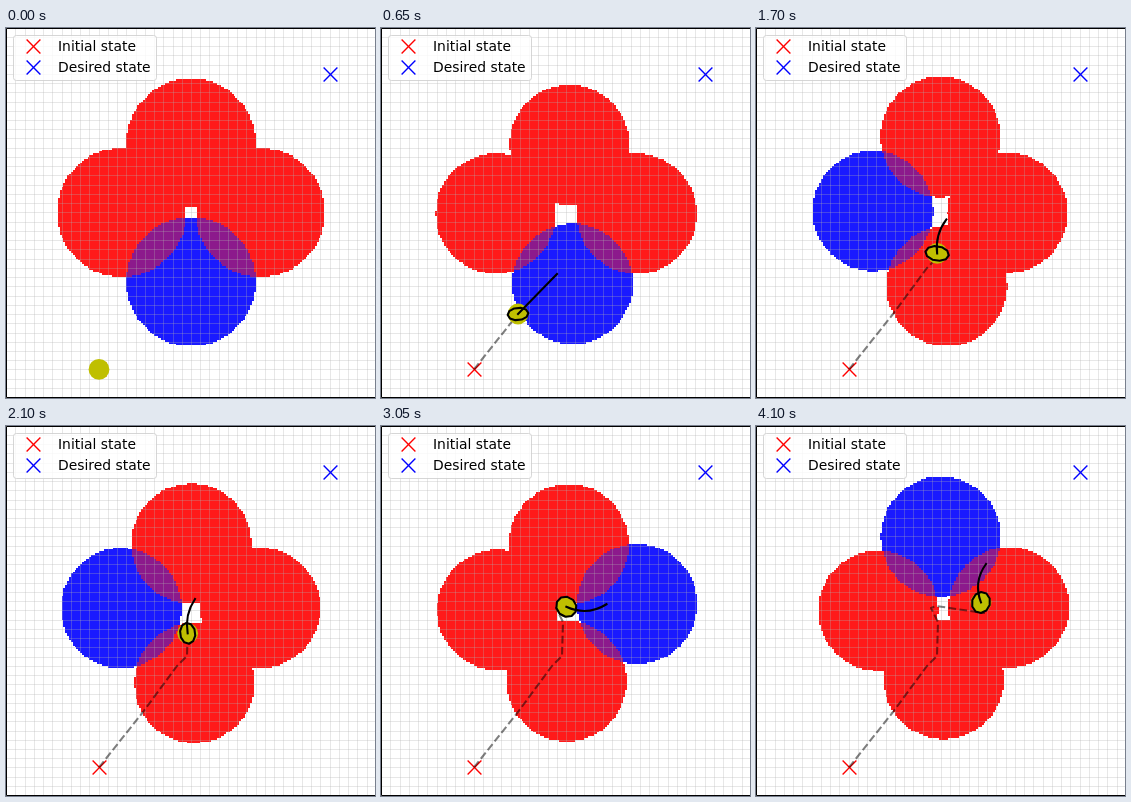
These frames come from a looping animation (369x370 px, 4.15 s). An HTML page:

```html
<!DOCTYPE html>
<html lang="en">
<head>
<meta charset="utf-8">
<title>Path planning between moving regions</title>
<style>
  html, body { margin: 0; width: 100%; height: 100%; overflow: hidden; background: #fff; }
  svg { display: block; width: 100vw; height: 100vh; }
  text { font: 13.89px "DejaVu Sans", sans-serif; }
  .cells { shape-rendering: crispEdges; }
  .line { fill: none; stroke: #000; stroke-width: 2.08; stroke-linejoin: round; }
  .cross { fill: none; stroke-width: 1.39; }
</style>
</head>
<body>
<svg viewBox="0 0 369 370" xmlns="http://www.w3.org/2000/svg">
  <defs><path id="cross" class="cross" d="M-6.9-6.9l13.8 13.8m0-13.8l-13.8 13.8"/></defs>
  <rect width="369" height="370" fill="#fff"/>
  <g class="cells">
    <path id="red" fill="#ff1a1a"/>
    <path id="blue" fill="#1a1aff"/>
    <path id="both" fill="#8c1a8c"/>
  </g>
  <path id="grid" stroke="#b0b0b0" stroke-opacity=".3" fill="none"/>
  <use href="#cross" x="93.5" y="341.5" stroke="red"/>
  <use href="#cross" x="324.5" y="46.5" stroke="blue"/>
  <path id="trail" class="line" stroke-opacity=".5" stroke-dasharray="7.71 3.33"/>
  <circle id="robot" r="10.4" fill="#bfbf00"/>
  <path id="plan" class="line" stroke-linecap="square"/>
  <path id="spread" class="line"/>
  <path d="M369 .5H.5V369.5H369" fill="none" stroke="#000"/>
  <rect x="7.5" y="7.5" width="143" height="45" rx="2.8" fill="#fff" fill-opacity=".8" stroke="#ccc" stroke-opacity=".8"/>
  <use href="#cross" x="27.5" y="18.5" stroke="red"/>
  <use href="#cross" x="27.5" y="39.5" stroke="blue"/>
  <text x="52" y="23">Initial state</text>
  <text x="52" y="44">Desired state</text>
</svg>
<script>
const LOOP = 4150, STEP = 50;
const CELLS = 200, TICKS = 40;

// The plot is 4 units wide and sits slightly off the pixel raster.
const UNIT = 92.4, SIDE = 4 * UNIT, LEFT = 0.2, TOP = -0.4;
const RADIUS = 0.65 * UNIT, FIRST_RADIUS = 0.7 * UNIT, REACH = 0.75 * UNIT;
const WOBBLE = 6;

// Regions are numbered clockwise from the right one.
const PHASES = [
  { until: 31, region: 1, bend: 0 },
  { until: 55, region: 2, bend: -0.2 },
  { until: 76, region: 0, bend: 0.27 },
  { until: Infinity, region: 3, bend: -0.27 }
];

// Key points of the robot and of its planned end: step, x, y
const ROUTE = [
  [0, 93, 341.4], [12, 137, 286], [24, 171, 240], [31, 181, 230], [46, 182, 196],
  [55, 175, 182], [58, 180, 180], [76, 228, 187], [81, 225, 176.5]
];
const AIM = [
  [0, 140, 288], [12, 176, 246], [24, 192, 212], [41, 189, 173], [54, 168, 170],
  [55, 212, 178], [75, 266, 179], [76, 231, 146], [81, 230, 138]
];

const set = (id, attributes) => {
  for (const name in attributes) document.getElementById(id).setAttribute(name, attributes[name]);
};
const phaseAt = step => PHASES.find(p => step < p.until);

function pointAt(keys, step) {
  const next = Math.max(1, keys.findIndex(k => k[0] >= step));
  const [s0, x0, y0] = keys[next - 1], [s1, x1, y1] = keys[next];
  const u = (step - s0) / (s1 - s0);
  return [x0 + (x1 - x0) * u, y0 + (y1 - y0) * u];
}

function random(seed) {
  const v = Math.sin(seed * 12.9898 + 4.1) * 43758.5453;
  return v - Math.floor(v);
}

// Roughly normal noise around zero.
function noise(seed) {
  let sum = -2;
  for (let i = 0; i < 4; i++) sum += random(seed * 4 + i);
  return sum;
}

function regionsAt(step) {
  const wobble = step ? WOBBLE : 0;
  return [0, 1, 2, 3].map(i => {
    const angle = i * Math.PI / 2, seed = step * 8 + i * 2;
    return [
      LEFT + SIDE / 2 + REACH * Math.cos(angle) + wobble * noise(seed),
      TOP + SIDE / 2 + REACH * Math.sin(angle) + wobble * noise(seed + 1)
    ];
  });
}

function drawRegions(step) {
  const regions = regionsAt(step), active = phaseAt(step).region;
  const radius = step ? RADIUS : FIRST_RADIUS;
  const cell = SIDE / CELLS;
  const px = col => Math.round(LEFT + col * cell);
  const py = row => Math.round(TOP + row * cell);
  const paths = ["", "", "", ""];
  for (let row = 0; row < CELLS; row++) {
    const y = TOP + (row + .5) * cell;
    let start = 0, last = 0;
    for (let col = 0; col <= CELLS; col++) {
      const x = LEFT + (col + .5) * cell;
      let kind = 0;
      regions.forEach(([cx, cy], i) => {
        if (Math.hypot(x - cx, y - cy) < radius) kind |= i === active ? 2 : 1;
      });
      if (kind === last) continue;
      if (last) paths[last] += `M${px(start)} ${py(row)}H${px(col)}V${py(row + 1)}H${px(start)}z`;
      start = col;
      last = kind;
    }
  }
  ["red", "blue", "both"].forEach((id, i) => set(id, { d: paths[i + 1] }));
}

function trailPath(step, robot) {
  const passed = ROUTE.filter(k => k[0] < step).map(([, x, y]) => [x, y]);
  return "M" + [...passed, robot].join("L");
}

function planPath(step, [x, y]) {
  const [endX, endY] = pointAt(AIM, step), { bend } = phaseAt(step);
  const dx = endX - x, dy = endY - y;
  return `M${x} ${y}Q${x + dx / 2 - bend * dy} ${y + dy / 2 + bend * dx} ${endX} ${endY}`;
}

// A ten-sided ellipse whose size and tilt change at every step.
function spreadPath(step, [x, y]) {
  const a = 9 + 5 * random(step + 500), b = 6 + 5 * random(step + 700);
  const tilt = Math.PI * random(step + 900);
  const c = Math.cos(tilt), s = Math.sin(tilt);
  const ring = Array.from({ length: 10 }, (_, i) => {
    const u = a * Math.cos(i * Math.PI / 5), v = b * Math.sin(i * Math.PI / 5);
    return [x + u * c - v * s, y + u * s + v * c];
  });
  return "M" + ring.join("L") + "z";
}

function drawRobot(step) {
  const robot = pointAt(ROUTE, step);
  set("robot", { cx: robot[0], cy: robot[1] });
  set("trail", { d: step ? trailPath(step, robot) : "" });
  set("plan", { d: step ? planPath(step, robot) : "" });
  set("spread", { d: step ? spreadPath(step, robot) : "" });
}

function drawGrid() {
  let d = "";
  for (let i = 1; i < TICKS; i++) {
    const x = Math.round(LEFT + i * SIDE / TICKS) + .5;
    const y = Math.round(TOP + i * SIDE / TICKS) + .5;
    d += `M${x} 0V370M0 ${y}H369`;
  }
  set("grid", { d });
}

let shown = -1;
function render(time) {
  // The first picture stays for two steps.
  const step = Math.max(0, Math.floor(time % LOOP / STEP) - 1);
  if (step === shown) return;
  drawRegions(step);
  drawRobot(step);
  shown = step;
}

const origin = performance.now();
function tick() {
  render(performance.now() - origin);
  requestAnimationFrame(tick);
}
drawGrid();
tick();
</script>
</body>
</html>
```
